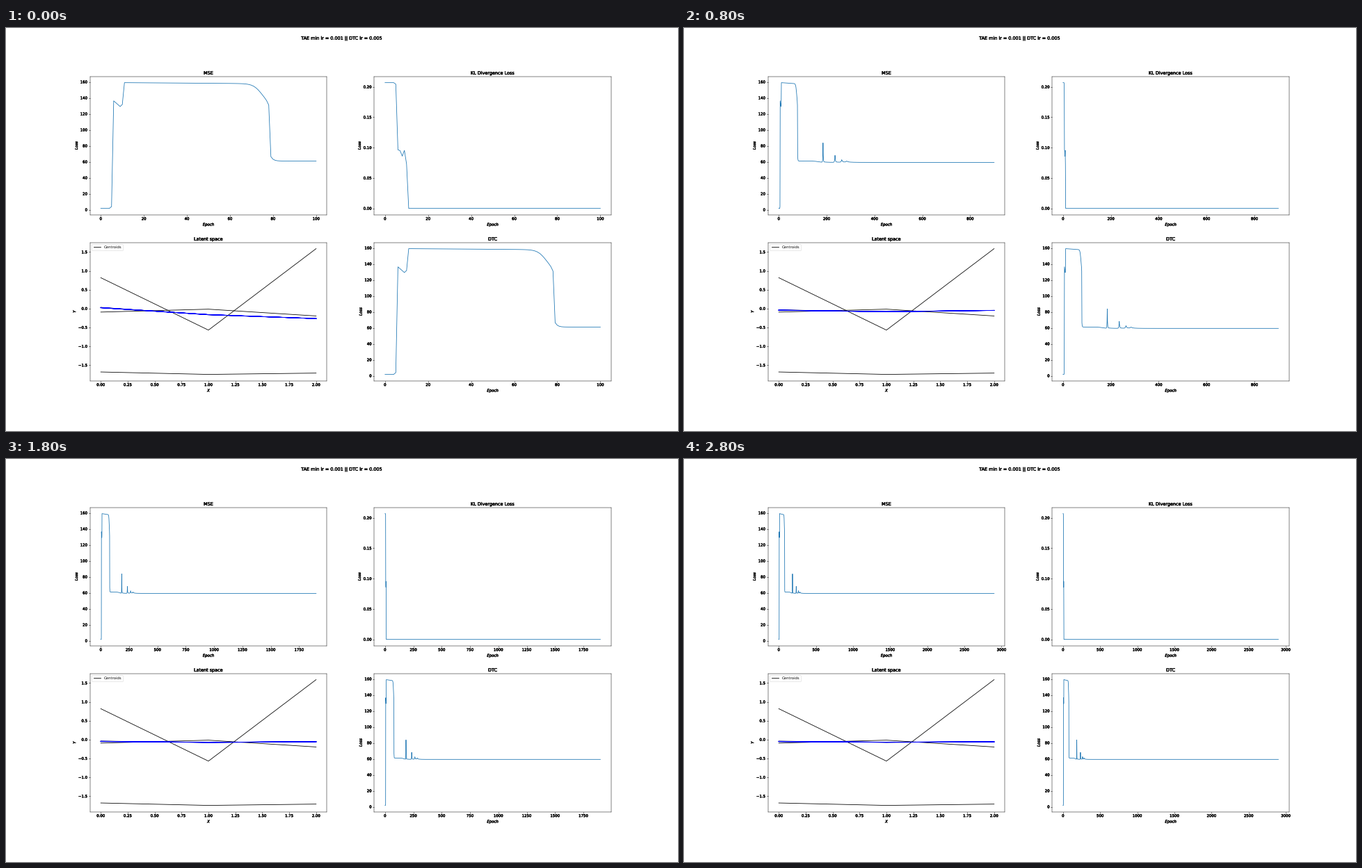
Write a matplotlib script that moves like this. It is 966x580 px and loops after 2900 ms.

```python
import numpy as np
import matplotlib.pyplot as plt
from matplotlib.animation import FuncAnimation
from matplotlib.patheffects import withStroke

DPI = 38.64
FRAMES = 29
EPOCHS_PER_FRAME = 100
SAMPLES = 12
HEAVY = [withStroke(linewidth=0.8, foreground="black")]

plt.rcParams.update({
    "font.family": "DejaVu Sans",
    "text.hinting": "none",
    "axes.linewidth": 0.9,
    "xtick.major.width": 1.0,
    "ytick.major.width": 1.0,
})

rng = np.random.default_rng(1)
epochs = np.arange(FRAMES * EPOCHS_PER_FRAME + 1)


def sigmoid(x):
    return 0.5 * (1 + np.tanh(x / 2))


def decay(x, span):
    """Exponential decay that stays at 1 before zero."""
    return np.exp(-np.maximum(x, 0) / span)


def total_loss(e):
    start = np.interp(e, [4, 5, 6, 9, 10, 11], [1.7, 4, 136.3, 129.2, 131.8, 159.1])
    plateau = (159.1 - 0.02 * (e - 11) - 24 * sigmoid((e - 74.5) / 1.9)
               - 6 * decay(78 - e, 1))
    settled = 59.3 + 5.5 * decay(e - 79, 1.1) + 1.7 * sigmoid((165 - e) / 9)
    loss = np.select([e <= 11, e <= 78], [start, plateau], settled)

    # Each instability is lower and wider than the one before it.
    for i, center in enumerate([185, 235, 263, 283]):
        loss += 24.2 * 0.36**i * decay(abs(e - center), 0.9 * 1.65**i)
        loss += np.where(e > center, 0.6 * decay(e - center, 18), 0)
    return loss


def divergence_loss(e):
    return np.interp(e, [4, 5, 6, 7, 8, 9, 10, 11],
                     [0.207, 0.2045, 0.0965, 0.095, 0.086, 0.0955, 0.073, 0])


def latent_path(e):
    """A fast and a slow drift towards the final latent values."""
    final = np.array([-0.05, -0.068, -0.06])
    slow = np.array([0.02, -0.032, 0.03])
    fast = np.array([0.055, -0.06, -0.235])
    return final + slow * decay(e - 100, 900) + fast * decay(e - 100, 80)


def thicken(texts):
    for text in texts:
        text.set_path_effects(HEAVY)


def label(ax, title, xlabel, ylabel):
    thicken([
        ax.set_title(title, pad=5),
        ax.set_xlabel(xlabel, style="italic", labelpad=6.5),
        ax.set_ylabel(ylabel, style="italic", labelpad=5),
    ])
    thicken(ax.get_xticklabels() + ax.get_yticklabels())


# The tiny surplus keeps the pixel size from truncating downwards.
fig, axes = plt.subplots(
    2, 2, dpi=DPI, figsize=(966.001 / DPI, 580.001 / DPI), facecolor="white")
fig.subplots_adjust(left=0.125, right=0.9005, bottom=0.1248, top=0.88,
                    wspace=0.2, hspace=0.2)
thicken([fig.suptitle("TAE min lr = 0.001 || DTC lr = 0.005", y=0.979)])

loss = total_loss(epochs)
loss_plots = []
for ax, title, values in [(axes[0, 0], "MSE", loss),
                          (axes[0, 1], "KL Divergence Loss", divergence_loss(epochs)),
                          (axes[1, 1], "DTC", loss)]:
    line, = ax.plot(epochs, values, color="C0")
    label(ax, title, "Epoch", "Loss")
    ax.set_ylim(ax.get_ylim())
    loss_plots.append((ax, line, values))

latent_ax = axes[1, 0]
steps = [0, 1, 2]
fixed_centroids = [(0.82, -0.57, 1.59), (-0.092, -0.015, -0.195), (-1.68, -1.745, -1.71)]
for i, heights in enumerate(fixed_centroids):
    latent_ax.plot(steps, heights, color="black",
                   label=None if i else "Centroids")
moving_centroid, = latent_ax.plot(steps, latent_path(0), color="black")
spread = rng.normal(0, 0.002, (SAMPLES, 3))
sample_lines = [latent_ax.plot(steps, latent_path(0), color="blue")[0]
                for _ in range(SAMPLES)]
latent_ax.legend(loc="upper left")
label(latent_ax, "Latent space", "X", "Y")


def update(frame):
    last = (frame + 1) * EPOCHS_PER_FRAME
    for ax, line, values in loss_plots:
        line.set_data(epochs[:last + 1], values[:last + 1])
        ax.set_xlim(-0.05 * last, 1.05 * last)
        thicken(ax.get_xticklabels())
    latent = latent_path(last)
    moving_centroid.set_ydata(latent + [0.008, -0.004, 0.002])
    for line, offset in zip(sample_lines, spread):
        line.set_ydata(latent + offset)


anim = FuncAnimation(fig, update, frames=FRAMES, interval=100,
                     repeat=True, repeat_delay=0, blit=False)
plt.show()
```
